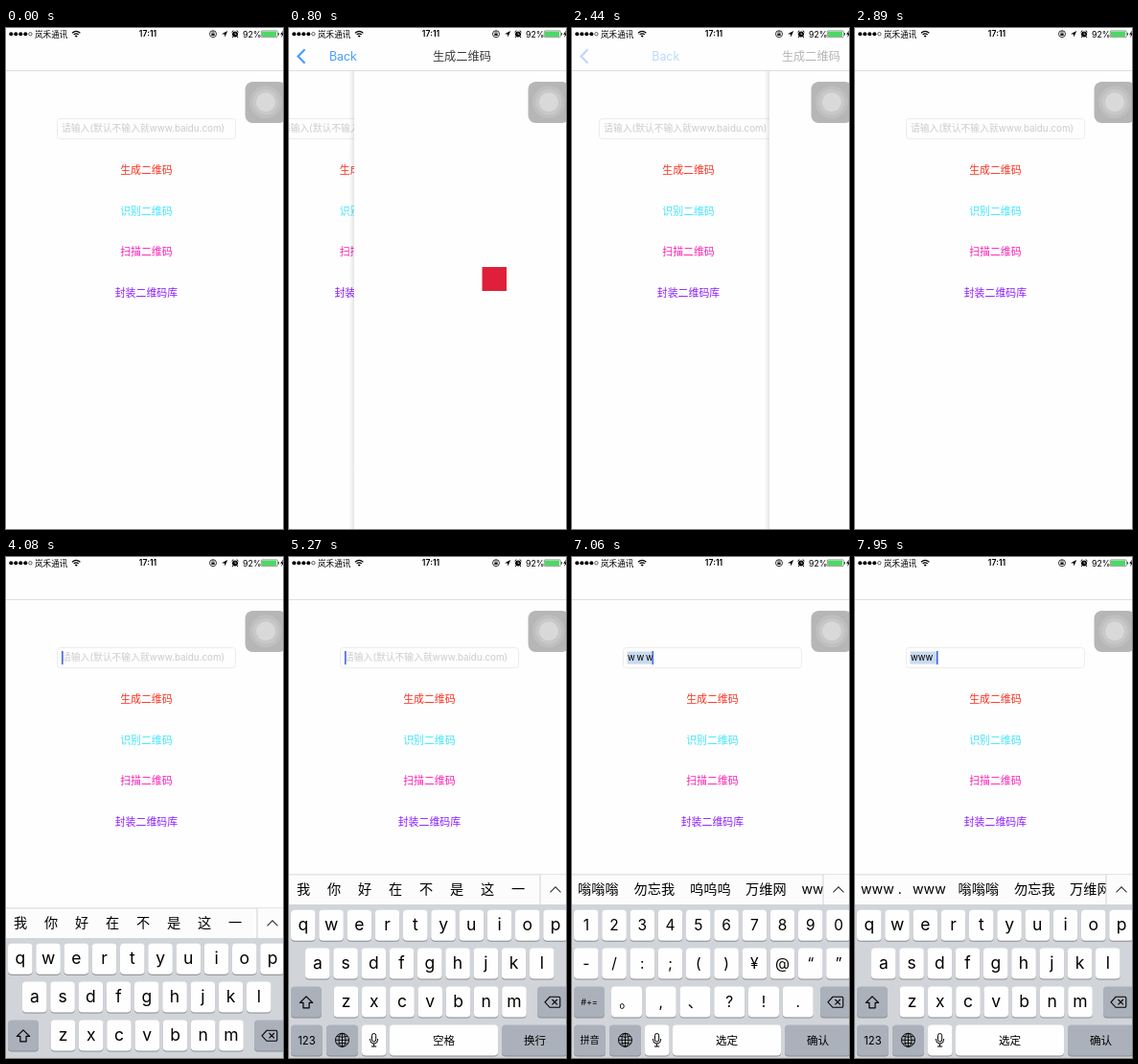
Animation of 289x522 px, one loop 8000 ms. Source, as an HTML page:

```html
<!DOCTYPE html>
<html lang="zh-CN">
<head>
<meta charset="utf-8">
<style>
  html, body { margin: 0; width: 100%; height: 100%; overflow: hidden; background: #fefefe; }
  svg { display: block; width: 100%; height: 100%; }
  text { font-family: Inter, "Noto Sans CJK SC", "Noto Sans CJK", sans-serif; }
</style>
</head>
<body>
<svg id="stage" viewBox="0 0 289 522"></svg>
<script>
const LOOP = 8000, WIDTH = 289;
const COMMON = '我你好在不是这一', W_WORDS = '我为无问外完玩万';
const WWW_WORDS = [[6, '嗡嗡嗡'], [64.5, '勿忘我'], [123, '呜呜呜'], [181, '万维网'], [239.5, 'www']];
const DOT_WORDS = [[6, 'www .'], [60, 'www'], [107.5, '嗡嗡嗡'], [166, '勿忘我'], [224, '万维网']];
const spread = chars => [...chars].map((c, i) => [8 + 32 * i, c]);

// Each step overrides the state left by the previous ones.
// page: left edge of the second screen; keys: vertical offset of the keyboard.
const steps = [
  [0, { page: WIDTH, pressed: false, keys: null, typed: '', caret: 0, words: spread(COMMON), symbols: false, popup: false }],
  [500, { pressed: true }],
  [800, { pressed: false, page: 68 }],
  [950, { page: 3 }],
  [1250, { page: 0 }],
  [2440, { page: 206 }],
  [2740, { page: 286 }],
  [2890, { page: WIDTH }],
  [4080, { keys: 35, caret: 1 }],
  [4380, { keys: 0 }],
  [4530, { caret: 0.5 }],
  [4830, { caret: 0 }],
  [5270, { caret: 1 }],
  [5720, { caret: 0 }],
  [6170, { caret: 1, typed: 'w', words: spread(W_WORDS), popup: true }],
  [6470, { typed: 'w w w', words: WWW_WORDS, popup: false }],
  [7060, { symbols: true }],
  [7800, { typed: 'www .', words: DOT_WORDS }],
  [7950, { symbols: false }],
];

const text = (x, y, size, str, attrs = '') => `<text x="${x}" y="${y}" font-size="${size}" ${attrs}>${str}</text>`;
const middle = (x, y, size, str, attrs = '') => text(x, y, size, str, `text-anchor="middle" ${attrs}`);
const rect = (x, y, w, h, fill, attrs = '') => `<rect x="${x}" y="${y}" width="${w}" height="${h}" fill="${fill}" ${attrs}/>`;
const circle = (x, y, r, fill, attrs = '') => `<circle cx="${x}" cy="${y}" r="${r}" fill="${fill}" ${attrs}/>`;
const line = (d, width = 1, color = '#000', attrs = '') =>
  `<path d="${d}" fill="none" stroke="${color}" stroke-width="${width}" ${attrs}/>`;
const group = (content, attrs) => `<g ${attrs}>${content}</g>`;

function statusBar() {
  const dots = [0, 1, 2, 3].map(i => circle(5.3 + 5 * i, 6.2, 2, '#000')).join('');
  return dots + circle(25.4, 6.2, 1.7, 'none', 'stroke="#000" stroke-width=".6"') +
    text(30, 9.5, 8.6, '岚禾通讯') +
    line('M69 5.2Q73.2 1.6 77.4 5.2M70.6 6.9Q73.2 4.7 75.8 6.9', 1.2) +
    '<path d="M71.7 8.2Q73.2 7 74.7 8.2L73.2 9.8Z"/>' +
    middle(148, 9.4, 8.6, '17:11', 'font-weight="600"') +
    circle(216, 6.2, 3.5, 'none', 'stroke="#000" stroke-width=".8"') + rect(214.4, 5.6, 3.2, 2.4, '#000') +
    line('M215 5.6V4.6a1 1 0 0 1 2 0V5.6', 0.6) +
    '<path d="M231.2 3L228.4 9.6L228 6.6L225 6.2Z"/>' +
    circle(239, 6.5, 3, '#000') + line('M235.5 4.2L237.3 2.6M242.5 4.2L240.7 2.6M236.8 9l-.8 1M241.2 9l.8 1', 1) +
    line('M239 4.6V6.6H240.5', 0.6, '#fff') +
    text(247, 9.6, 8.8, '92%') +
    rect(266.3, 2.9, 17, 6.8, 'none', 'rx="1" stroke="#333" stroke-width=".5"') +
    rect(267, 3.6, 15, 5.4, '#4cd964') + rect(283.8, 5, 1, 2.6, '#333') +
    '<path d="M289 2.4L286.2 6.8H288L287.2 10L290 5.6H288.3Z"/>';
}

function typedField(s) {
  const box = rect(53.5, 94.5, 186, 21, '#fefefe', 'rx="3" stroke="#ececec"');
  const caretX = { '': 58, w: 65.5, 'w w w': 83.5, 'www .': 85 }[s.typed];
  const content = s.typed
    ? rect(57.5, 98.5, caretX - 57.5, 13, '#c8dbef') +
      text(58, 108.3, 9.5, s.typed.replaceAll(' ', s.typed === 'w w w' ? '\u2009' : ' '))
    : text(58, 108.4, 9.8, '请输入(默认不输入就www.baidu.com)', 'fill="#cbcbd0"');
  return box + content + rect(caretX, 98, 1.6, 14, '#4769e2', `opacity="${s.caret}"`);
}

function menu(s) {
  const items = [['生成二维码', '#ff3020'], ['识别二维码', '#42e6fb'], ['扫描二维码', '#fb20b4'], ['封装二维码库', '#8a1cff']];
  return typedField(s) + items.map(([label, color], i) =>
    middle(146.4, 152 + 42.7 * i, 10.9, label, `fill="${color}" opacity="${s.pressed && i === 0 ? 0.3 : 1}"`)).join('');
}

function codePage(x) {
  const shadow = rect(-5, 45, 5, 477, 'url(#edge)');
  return group(shadow + rect(0, 45, WIDTH, 477, '#fefefe') + rect(133.5, 249, 25.5, 25, '#e01f3a'), `transform="translate(${x})"`);
}

function navBar(x) {
  const shown = 1 - x / WIDTH;
  return rect(0, 0, WIDTH, 44, '#fefefe') + rect(0, 44, WIDTH, 1, '#dedede') +
    group(line('M16.5 22.3L9.5 29.5L16.5 36.7', 2.2, '#1480ff') +
      text(21.5 + x * 0.3, 33.8, 12.4, 'Back', 'fill="#1480ff"') +
      middle(146.4 + x * 0.5, 33.8, 12.2, '生成二维码', 'font-weight="500"'), `opacity="${shown}"`);
}

function touchButton() {
  return rect(249.5, 56, 43, 43, '#b6b6b6', 'rx="8"') +
    circle(271, 77.3, 17, '#bfbfbf') + circle(271, 77.3, 13.5, '#c8c8c8') + circle(271, 77.3, 10, '#d9d9d9');
}

const rowTop = row => 367.7 + 39.9 * row;

function key(x, row, width, label = '', size = 17.5, dark = false) {
  const y = rowTop(row), color = dark ? '#abb1bb' : '#fefefe';
  const drop = /[a-z]/.test(label) ? 5 : size * 0.37;
  return rect(x, y + 1, width, 32, '#888b91', 'rx="4"') + rect(x, y, width, 32, color, 'rx="4"') +
    middle(x + width / 2, y + 16 + drop, size, label);
}

const keyRow = (chars, row, x, size, pitch = 29.25, width = 25.6) =>
  [...chars].map((c, i) => key(x + pitch * i, row, width, c, size)).join('');

const letterRows = () => keyRow('qwertyuiop', 0, 2, 17.5) + keyRow('asdfghjkl', 1, 17, 17.5) + keyRow('zxcvbnm', 2, 46.7, 17.5) +
  key(2, 2, 32, '', 0, true) + line('M18 457.8l6.6 6.6h-3.5v5.4h-6.2v-5.4h-3.5z', 1.2, '#000', 'stroke-linejoin="round"');

const symbolRows = () => keyRow('1234567890', 0, 2, 15.5) + keyRow('-/:;()¥@“”', 1, 2, 15.5) +
  keyRow('。,、?!.', 2, 41, 15.5, 35.75, 32) + key(2, 2, 32, '#+=', 9, true);

function bottomRow(s) {
  return key(2, 3, 33, s.symbols ? '拼音' : '123', s.symbols ? 10 : 11.3, true) +
    key(39, 3, 33, '', 0, true) + key(76, 3, 25.5) +
    key(105, 3, 113, s.typed ? '选定' : '空格', 11.6) + key(222, 3, 69, s.typed ? '确认' : '换行', 11.6, true) +
    circle(55.5, 503.3, 7, 'none', 'stroke="#000"') +
    line('M55.5 496.3V510.3M48.5 503.3H62.5M50 499.3Q55.5 501.3 61 499.3M50 507.3Q55.5 505.3 61 507.3', 0.9) +
    '<ellipse cx="55.5" cy="503.3" rx="3.5" ry="7" fill="none" stroke="#000" stroke-width=".9"/>' +
    rect(86.5, 496.5, 4.2, 8.5, 'none', 'rx="2.1" stroke="#000"') +
    line('M84.6 502v1a4 4 0 0 0 8 0v-1M88.6 507V510M86 510H91.2');
}

function keyPopup() {
  return '<path d="M26 318H63Q68 318 68 323V351C68 359 57.2 360 57.2 368V396Q57.2 400 53 400H36Q31.5 400 31.5 396V368C31.5 360 21 359 21 351V323Q21 318 26 318Z" fill="#fefefe" stroke="#c5c7cb" stroke-width=".6"/>' +
    middle(44.4, 346, 27, 'w');
}

function keyboard(s) {
  const bar = rect(0, 330.5, WIDTH, 32, '#fcfcfd') + rect(0, 330.5, WIDTH, 0.8, '#cfd0d3') +
    s.words.map(([x, word]) => text(x, 351.2, 14.2, word)).join('') +
    rect(262, 331.3, 27, 31, '#fcfcfd') + rect(261.5, 331, 1, 31, '#d0d1d4') + line('M272.5 349.3L278 343.8L283.5 349.3', 1.1, '#333');
  const erase = key(259, 2, 32, '', 0, true) + line('M267 463.8l5-5.5h9.5q1.3 0 1.3 1.3v8.4q0 1.3-1.3 1.3H272zM274.5 461l5.4 5.4M279.9 461l-5.4 5.4', 1.1);
  return group(bar + rect(0, 362, WIDTH, 160, '#d1d5da') + (s.symbols ? symbolRows() : letterRows()) +
    erase + bottomRow(s) + (s.popup ? keyPopup() : ''), `transform="translate(0 ${s.keys})"`);
}

function draw(s) {
  const menuShift = -0.3 * (WIDTH - s.page);
  return '<defs><linearGradient id="edge"><stop stop-opacity="0"/><stop offset="1" stop-opacity=".1"/></linearGradient></defs>' +
    rect(0, 0, WIDTH, 522, '#fefefe') + group(menu(s), `transform="translate(${menuShift})"`) +
    (s.page < WIDTH ? codePage(s.page) : '') + navBar(s.page) + statusBar() +
    (s.keys === null ? '' : keyboard(s)) + touchButton();
}

const stage = document.getElementById('stage');
let shownStep = -1;

function tick() {
  const time = performance.now() % LOOP;
  const current = steps.findLastIndex(([start]) => start <= time);
  if (current !== shownStep) {
    shownStep = current;
    stage.innerHTML = draw(Object.assign({}, ...steps.slice(0, current + 1).map(step => step[1])));
  }
  requestAnimationFrame(tick);
}
tick();
</script>
</body>
</html>
```
